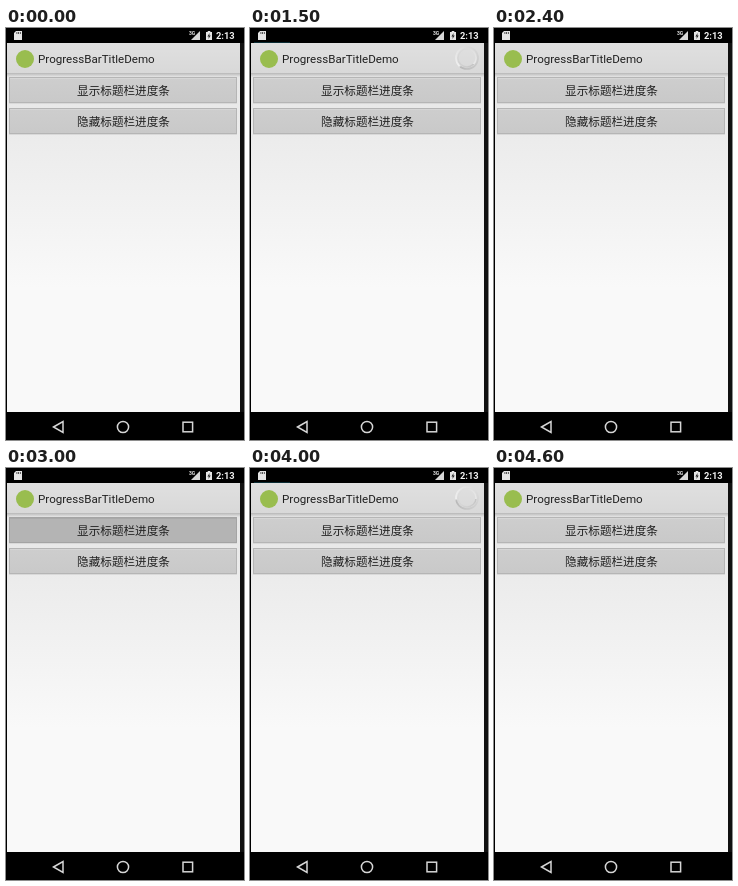
Write an HTML page with a canvas that moves like this. It is 238x412 px and loops after 5600 ms.

```html
<!DOCTYPE html>
<html lang="zh">
<head>
<meta charset="utf-8">
<title>ProgressBarTitleDemo</title>
<style>
html, body { margin: 0; width: 100%; height: 100%; overflow: hidden; background: #000; }
canvas { display: block; width: 238px; height: 412px; }
</style>
</head>
<body>
<canvas id="stage"></canvas>
<script>
const W = 238, H = 412, LOOP = 5600, STEP = 100;
const canvas = document.getElementById('stage');
const ctx = canvas.getContext('2d');
const dpr = window.devicePixelRatio || 1;
canvas.width = W * dpr;
canvas.height = H * dpr;

// Each run: show pressed, spinner on, hide pressed, fade begins, spinner gone.
const runs = [
  { show: 700, on: 900, hide: 1900, fade: 2100, off: 2400 },
  { show: 3000, on: 3200, hide: 4200, fade: 4400, off: 4600 }
];

function rect(x, y, w, h, fill) {
  ctx.fillStyle = fill;
  ctx.fillRect(x, y, w, h);
}

function vertical(y0, y1, ...colors) {
  const g = ctx.createLinearGradient(0, y0, 0, y1);
  colors.forEach((c, i) => g.addColorStop(i / (colors.length - 1), c));
  return g;
}

function label(str, x, y, font, color, align = 'left') {
  ctx.font = font;
  ctx.fillStyle = color;
  ctx.textAlign = align;
  ctx.fillText(str, x, y);
}

function poly(points, fill) {
  ctx.beginPath();
  points.forEach(([x, y]) => ctx.lineTo(x, y));
  ctx.closePath();
  if (fill) {
    ctx.fillStyle = fill;
    ctx.fill();
  } else ctx.stroke();
}

function statusBar() {
  rect(0, 0, W, 15, '#000');
  poly([[10, 3], [16, 3], [16, 12], [8, 12], [8, 5]], '#e4e4e4');
  [10.5, 12.2, 13.9].forEach(x => rect(x, 4, 0.8, 2, '#333'));
  poly([[194, 3], [194, 12], [185, 12]], '#d8d8d8');
  label('3G', 183, 6.5, 'bold 5px Roboto, sans-serif', '#e8e8e8');
  rect(200, 4, 6, 8, '#e4e4e4');
  rect(201.7, 3, 2.6, 1, '#e4e4e4');
  poly([[203.6, 5], [201.4, 8.5], [202.8, 8.5], [202.4, 11], [204.7, 7.4], [203.3, 7.4]], '#222');
  label('2:13', 210, 11, 'bold 9.3px Roboto, sans-serif', '#f2f2f2');
}

function titleBar() {
  rect(1, 15, 233, 31, vertical(15, 46, '#e0e0e0', '#d8d8d8'));
  rect(1, 45, 233, 1, '#bdbdbd');
  rect(1, 46, 233, 3, vertical(46, 49, '#c4c4c4', '#e5e5e5'));
  ctx.fillStyle = '#99bd4f';
  ctx.beginPath();
  ctx.arc(19, 31, 9, 0, 7);
  ctx.fill();
  label('ProgressBarTitleDemo', 32, 35, '11.6px Roboto, sans-serif', '#202020');
}

function button(str, y, pressed) {
  rect(3, y, 228, 26, pressed ? '#a4a4a4' : '#b5b5b5');
  rect(4, y + 1, 226, 24, pressed ? '#b4b4b4' : vertical(y, y + 25, '#cecece', '#c9c9c9'));
  rect(4, y + 1, 226, 1, pressed ? '#a9a9a9' : '#d6d6d6');
  rect(3, y + 26, 228, 1, '#d9d9d9');
  label(str, 117.5, y + 17.5, '11.6px "Noto Sans CJK SC", "Noto Sans CJK", sans-serif', '#202020', 'center');
}

function navBar() {
  rect(0, 384, W, 28, '#000');
  ctx.strokeStyle = '#d6d6d6';
  ctx.lineWidth = 1.5;
  poly([[47.5, 399], [57, 393.5], [57, 404.5]]);
  ctx.beginPath();
  ctx.arc(117, 399, 5.6, 0, 7);
  ctx.stroke();
  ctx.strokeRect(177, 394.2, 9.6, 9.6);
}

function ring(r, width, angle, stops) {
  const g = ctx.createConicGradient(angle, 217, 30);
  stops.forEach(([at, c]) => g.addColorStop(at, c));
  ctx.strokeStyle = g;
  ctx.lineWidth = width;
  ctx.beginPath();
  ctx.arc(217, 30, r, 0, 7);
  ctx.stroke();
}

function spinner(age, alpha) {
  ctx.globalAlpha = alpha;
  const a = 0.2 + age * 0.0036;
  ring(11, 1.7, a, [[0, '#efefef'], [0.3, '#e2e2e2'], [0.65, '#cecece'], [0.97, '#b8b8b8'], [1, '#efefef']]);
  ring(9, 1.4, Math.PI - a, [[0, '#c4c4c4'], [0.35, '#d5d5d5'], [1, '#e8e8e8']]);
  rect(4, 14, 36, 1, '#0b2c35');
  ctx.globalAlpha = 1;
}

function draw(time) {
  const t = Math.floor((time % LOOP) / STEP) * STEP;
  const within = (a, b) => t >= a && t < b;
  ctx.setTransform(dpr, 0, 0, dpr, 0, 0);
  rect(0, 0, W, H, '#111');
  rect(0, 0, 1, H, '#000');
  rect(1, 46, 233, 338, vertical(46, 260, '#e6e6e6', '#f9f9f9'));
  statusBar();
  titleBar();
  button('显示标题栏进度条', 49, runs.some(r => within(r.show, r.on)));
  button('隐藏标题栏进度条', 80, runs.some(r => within(r.hide, r.fade)));
  navBar();
  const run = runs.find(r => within(r.on, r.off));
  if (run) {
    const alpha = t < run.fade ? 1 : (run.off - t) / (run.off - run.fade);
    spinner(t - run.on, alpha);
  }
}

const start = performance.now();
function tick() {
  draw(performance.now() - start);
  requestAnimationFrame(tick);
}
tick();
</script>
</body>
</html>
```
